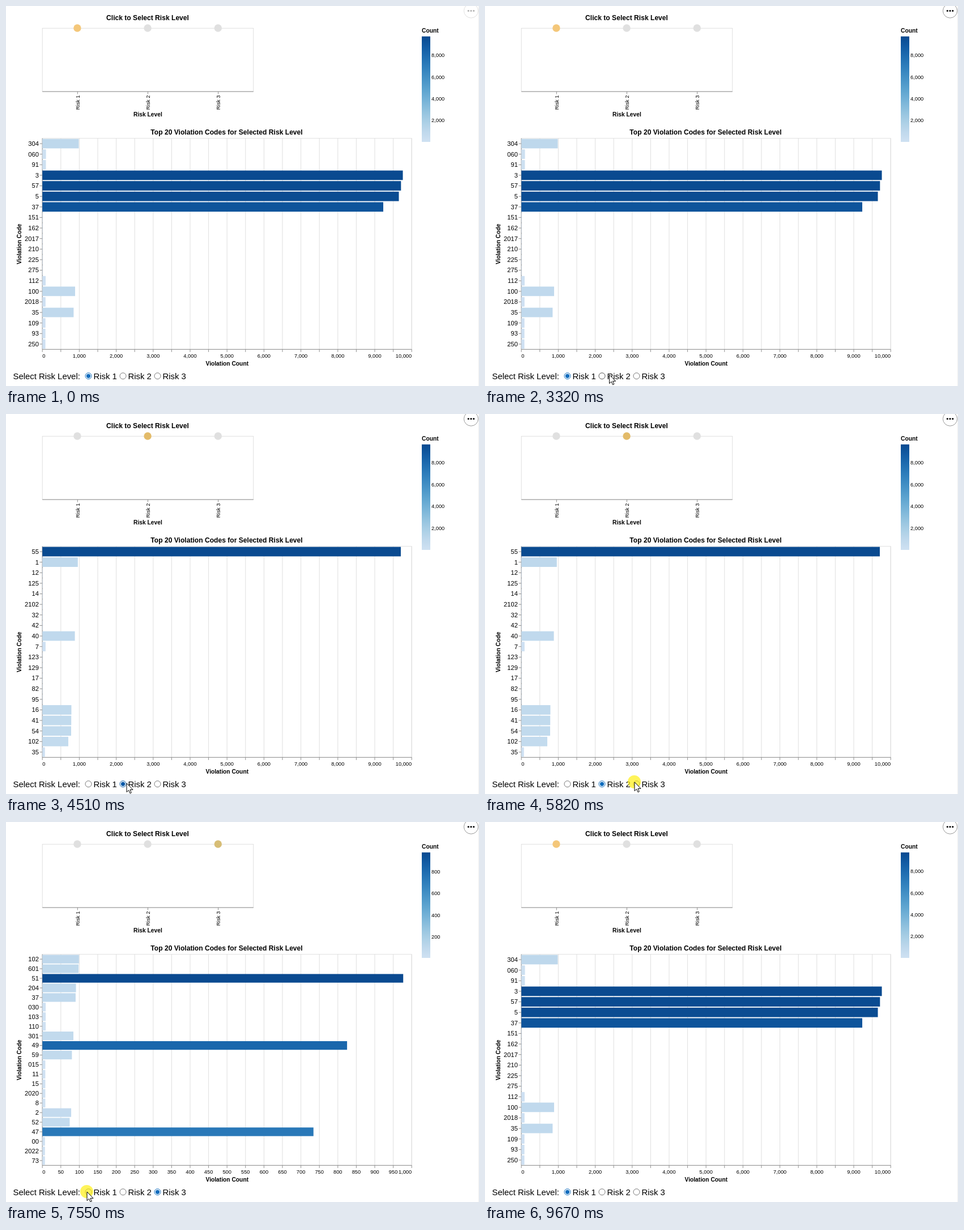
These frames come from a looping animation (835x671 px, 9.74 s). An HTML page:

```html
<!DOCTYPE html>
<html lang="en">
<head>
<meta charset="utf-8">
<title>Violation codes by risk level</title>
<style>
html, body { margin: 0; width: 100%; height: 100%; overflow: hidden; background: #fff; }
svg { display: block; width: 835px; height: 671px; font-family: "Liberation Sans", Arial, sans-serif; }
</style>
</head>
<body>
<svg id="stage" viewBox="0 0 835 671" xmlns="http://www.w3.org/2000/svg">
  <defs><linearGradient id="ramp" x1="0" y1="1" x2="0" y2="0"></linearGradient></defs>
  <g id="frame"></g>
  <g id="chart"></g>
  <g id="radios"></g>
  <g id="menu"></g>
  <circle id="press" r="11.5" fill="#fff01a" fill-opacity=".72"/>
  <path id="cursor" d="M0 0V15.6L3.6 12.3L6 17.8L8.3 16.8L6 11.4H11Z" fill="#fff" stroke="#000" stroke-width="1"/>
</svg>
<script>
const LOOP = 9740;
const X0 = 64.2, Y0 = 233.7, W = 652, H = 372.6;
const LABEL = 9.31, TITLE = 10.25, HEAD = 12.1;
const BLUES = "cfe1f2 bed8ec a8cee5 8fc1de 74b2d7 5ba3cf 4592c6 3181bd 206fb2 125ca4 0a4a90".split(" ");
const RADIO_X = [145.5, 206.5, 267.5];

const CHARTS = [
  { max: 10000, every: 2, dot: "#f4c77a",
    codes: "304 060 91 3 57 5 37 151 162 2017 210 225 275 112 100 2018 35 109 93 250",
    values: [985, 98, 96, 9760, 9710, 9652, 9230, 9, 9, 9, 9, 9, 9, 89, 886, 86, 846, 84, 83, 82] },
  { max: 10000, every: 2, dot: "#e3bb69",
    codes: "55 1 12 125 14 2102 32 42 40 7 123 129 17 82 95 16 41 54 102 35",
    values: [9705, 960, 9, 9, 9, 9, 9, 9, 880, 87, 8, 8, 8, 8, 8, 786, 782, 779, 702, 69] },
  { max: 1000, every: 1, dot: "#d7bd76",
    codes: "102 601 51 204 37 030 103 110 301 49 59 015 11 15 2020 8 2 52 47 00 2022 73",
    values: [99, 98, 977, 91, 90, 9, 9, 9, 84, 825, 80, 8, 8, 8, 8, 8, 78, 74, 734, 7, 7, 7] }
];

// Pointer moves: start, end, steps, way points
const MOVES = [
  [1250, 1450, 4, [[830, 480], [740, 560], [660, 620], [570, 662], [560, 700]]],
  [2520, 3450, 14, [[535, 677], [558, 655], [470, 652], [330, 650], [250, 650], [220, 651], [217, 651]]],
  [3520, 4050, 7, [[217, 651], [219, 650], [214, 652], [213, 652]]],
  [4990, 5400, 7, [[213, 652], [228, 650], [252, 649], [262, 650], [264, 650]]],
  [6590, 6930, 6, [[264, 650], [230, 651], [165, 653], [142, 654]]],
  [7080, 7300, 4, [[142, 654], [142, 653], [143, 653]]],
  [8410, 8740, 6, [[143, 653], [200, 642], [330, 638], [480, 642], [608, 655], [640, 700]]]
];

// Clicks: start, end, centre
const PRESSES = [
  [4330, 4510, 212.5, 651.5],
  [5820, 6080, 263.5, 649.5],
  [7550, 7830, 142.5, 652.5]
];

const $ = id => document.getElementById(id);
const comma = n => n.toLocaleString("en-US");

function text(s, x, y, size, o = {}) {
  const turn = o.turn ? ` transform="rotate(-90 ${x} ${y})"` : "";
  return `<text x="${x}" y="${y}" font-size="${size}" text-anchor="${o.at || "middle"}"` +
    `${o.bold ? ' font-weight="bold"' : ""} fill="#000"${turn}>${s}</text>`;
}

const line = (x1, y1, x2, y2, c = "#888") =>
  `<path d="M${x1} ${y1}L${x2} ${y2}" stroke="${c}" stroke-width=".93"/>`;

const box = (x, y, w, h) =>
  `<rect x="${x}" y="${y}" width="${w}" height="${h}" fill="none" stroke="#ddd" stroke-width=".93"/>`;

function blue(t) {
  const u = Math.max(0, Math.min(.9999, t)) * 10, i = Math.floor(u);
  const part = (hex, k) => parseInt(hex.substr(k, 2), 16);
  const mix = [0, 2, 4].map(k => {
    const a = part(BLUES[i], k), b = part(BLUES[i + 1], k);
    return Math.round(a + (b - a) * (u - i));
  });
  return `rgb(${mix})`;
}

function drawFrame() {
  $("ramp").innerHTML = BLUES.map((c, i) => `<stop offset="${i / 10}" stop-color="#${c}"/>`).join("");
  let s = line(834.5, 0, 834.5, 671, "#eee");
  s += text("Click to Select Risk Level", 250, 25, HEAD, { bold: 1 });
  s += box(X0, 39.3, 372.6, 111.8) + line(X0, 151.1, X0 + 372.6, 151.1);
  for (let i = 0; i < 3; i++) {
    const x = X0 + 124.2 * (i + .5);
    s += line(x, 151, x, 155.7);
    s += text("Risk " + (i + 1), x + 3.2, 157.5, LABEL, { at: "end", turn: 1 });
  }
  s += text("Risk Level", 250.4, 195, TITLE, { bold: 1 });
  s += text("Top 20 Violation Codes for Selected Risk Level", 389.5, 227.3, HEAD, { bold: 1 });
  s += text("Violation Count", 390.3, 635, TITLE, { bold: 1 });
  s += text("Violation Code", 27, 420.3, TITLE, { bold: 1, turn: 1 });
  s += text("Count", 734, 46.8, TITLE, { at: "start", bold: 1 });
  s += '<rect x="734" y="53.7" width="15" height="186.3" fill="url(#ramp)"/>';
  s += text("Select Risk Level:", 12.5, 659.2, 14.9, { at: "start" });
  RADIO_X.forEach((x, i) => {
    s += text("Risk " + (i + 1), x + 9, 659.2, 14.9, { at: "start" });
  });
  $("frame").innerHTML = s;
}

function drawChart(state) {
  const c = CHARTS[state], codes = c.codes.split(" "), step = H / codes.length;
  const lo = Math.min(...c.values), hi = Math.max(...c.values);
  const norm = v => (v - lo) / (hi - lo);
  let s = box(X0, Y0, W, H), bars = "";
  for (let i = 0; i <= 20; i++) {
    const x = X0 + W * i / 20;
    s += line(x, Y0, x, Y0 + H, "#ddd") + line(x, Y0 + H, x, Y0 + H + 4.7);
    if (i % c.every === 0) {
      const at = i === 0 ? "start" : i === 20 ? "end" : "middle";
      s += text(comma(c.max * i / 20), x, 621, LABEL, { at });
    }
  }
  s += line(X0, Y0, X0, Y0 + H) + line(X0, Y0 + H, X0 + W, Y0 + H);
  codes.forEach((code, i) => {
    const y = Y0 + step * (i + .5), v = c.values[i];
    s += line(X0 - 4.7, y, X0, y) + text(code, 57.9, y + 3.9, 11.18, { at: "end" });
    bars += `<rect x="${X0}" y="${y - step * .45}" width="${W * v / c.max}" height="${step * .9}" fill="${blue(norm(v))}"/>`;
  });
  s += bars;
  for (let i = 0; i < 3; i++)
    s += `<circle cx="${X0 + 124.2 * (i + .5) - .4}" cy="39" r="6.7" fill="${i === state ? c.dot : "#e0e0e0"}"/>`;
  for (let i = 1; i < 5; i++) {
    const v = c.max * i / 5;
    s += text(comma(v), 751, 240 - 186.3 * norm(v) + 3, LABEL, { at: "start" });
  }
  $("chart").innerHTML = s;
}

function drawRadios(state, hover) {
  $("radios").innerHTML = RADIO_X.map((x, i) => {
    const on = i === state, over = i === hover;
    const color = on ? (over ? "#0558a8" : "#0f6cbd") : (over ? "#4f4f4f" : "#767676");
    return `<circle cx="${x}" cy="653.3" r="5.5" fill="#fff" stroke="${color}" stroke-width="1"/>` +
      (on ? `<circle cx="${x}" cy="653.3" r="3.6" fill="${color}"/>` : "");
  }).join("");
}

function drawMenu() {
  $("menu").innerHTML = '<circle cx="821" cy="8.5" r="12.6" fill="#fff" stroke="#999" stroke-width="1"/>' +
    [-4.7, 0, 4.7].map(d => `<circle cx="${821 + d}" cy="8.5" r="1.6"/>`).join("");
}

function pointer(t) {
  const move = MOVES.filter(m => t >= m[0]).pop();
  if (!move) return [-50, -50];
  const [start, end, n, pts] = move;
  const k = Math.min(n - 1, Math.floor((t - start) / (end - start) * (n - 1) + 1e-6));
  const u = (k + 1) / n * (pts.length - 1);
  const i = Math.min(pts.length - 2, Math.floor(u)), f = u - i;
  return [0, 1].map(a => pts[i][a] + (pts[i + 1][a] - pts[i][a]) * f);
}

let lastState = -1, lastKey = "";

function render(t) {
  const state = t < 4510 ? 0 : t < 6000 ? 1 : t < 7830 ? 2 : 0;
  if (state !== lastState) drawChart(lastState = state);

  const [x, y] = pointer(t);
  const hover = y > 645 && y < 664 ? RADIO_X.findIndex(r => x > r - 7 && x < r + 51) : -1;
  const key = state + "/" + hover;
  if (key !== lastKey) {
    drawRadios(state, hover);
    lastKey = key;
  }
  $("cursor").setAttribute("transform", `translate(${x} ${y})`);

  const press = PRESSES.find(p => t >= p[0] && t < p[1]);
  $("press").setAttribute("visibility", press ? "visible" : "hidden");
  if (press) {
    $("press").setAttribute("cx", press[2]);
    $("press").setAttribute("cy", press[3]);
  }
  const fade = Math.max(0, Math.min(1, (t - 1190) / 260));
  $("menu").setAttribute("opacity", t < 1250 ? .3 : .3 + .7 * fade);
}

drawFrame();
drawMenu();
render(0);
const begin = performance.now();
(function tick() {
  render((performance.now() - begin) % LOOP);
  requestAnimationFrame(tick);
})();
</script>
</body>
</html>
```
